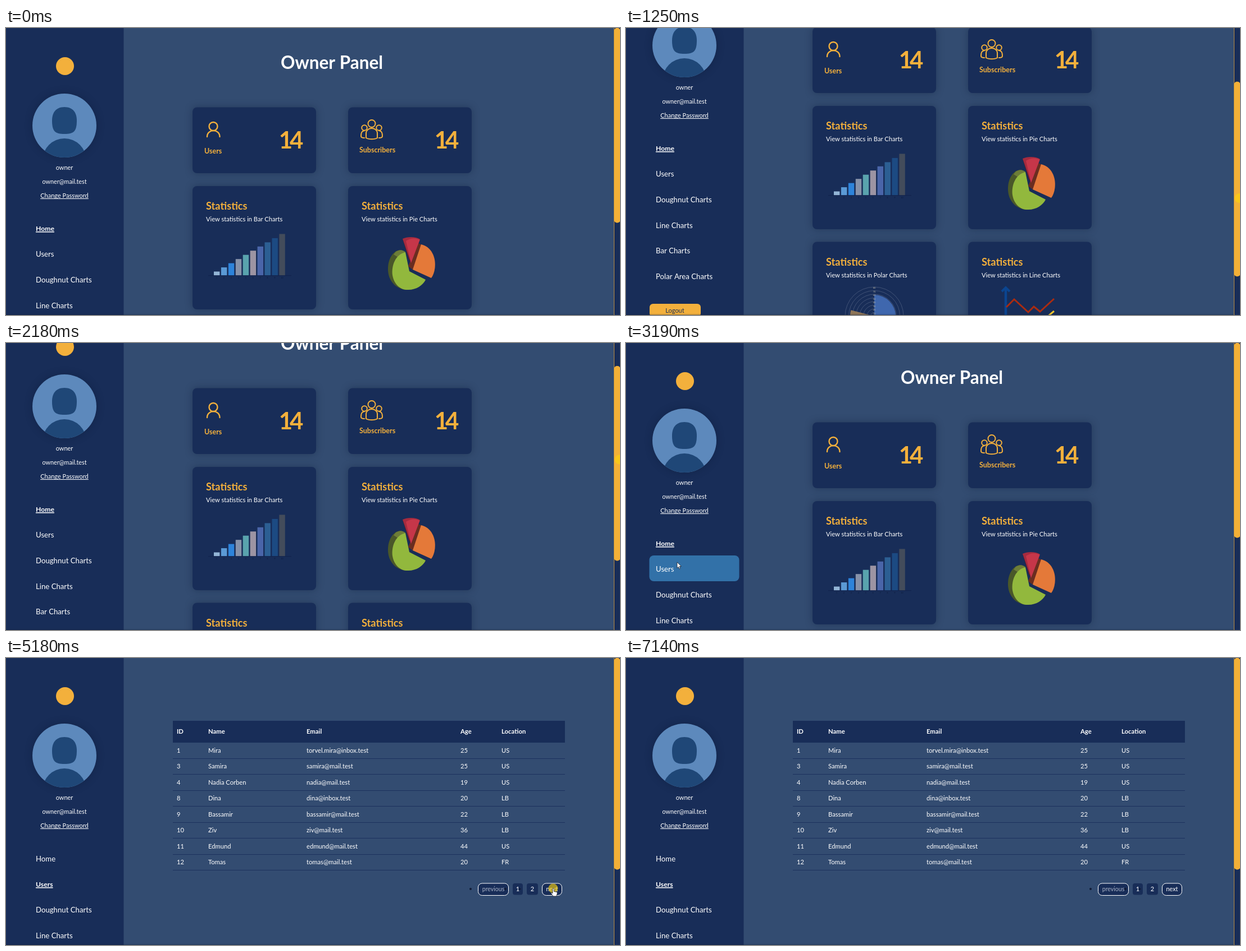
An HTML page with a canvas for the animation above (7470 ms loop, 1093 by 512 pixels).

```html
<!DOCTYPE html>
<html lang="en">
<head>
<meta charset="utf-8">
<title>Dashboard</title>
<style>
html, body { margin: 0; width: 100%; height: 100%; overflow: hidden; background: #334c71; }
canvas { display: block; width: 1093px; height: 512px; }
</style>
</head>
<body>
<canvas id="stage" width="1093" height="512"></canvas>
<script>
const ctx = document.getElementById('stage').getContext('2d');
const W = 1093, H = 512, LOOP = 7470, MAX_SCROLL = 245;
const NAVY = '#182d58', SLATE = '#334c71', GOLD = '#f3b03c', WHITE = '#fff';
const MENU = ['Home', 'Users', 'Doughnut Charts', 'Line Charts', 'Bar Charts', 'Polar Area Charts'];
const BARS = ['#93b5d6', '#5b9ad5', '#2d83da', '#8792a9', '#59a3ad', '#9c94a3', '#4a65a9', '#2c5f93', '#1c4a82', '#434c5b'];
const HEAD = ['ID', 'Name', 'Email', 'Age', 'Location'];
const PAGES = [[
  '1|Mira|torvel.mira@inbox.test|25|US', '3|Samira|samira@mail.test|25|US',
  '4|Nadia Corben|nadia@mail.test|19|US', '8|Dina|dina@inbox.test|20|LB',
  '9|Bassamir|bassamir@mail.test|22|LB', '10|Ziv|ziv@mail.test|36|LB',
  '11|Edmund|edmund@mail.test|44|US', '12|Tomas|tomas@mail.test|20|FR'
], [
  '13|Selma|selma@mail.test|31|FR', '14|Anton|anton@mail.test|27|US',
  '15|Noor|noor@mail.test|23|LB', '16|Petra|petra@mail.test|38|US',
  '17|Walid|walid@mail.test|29|LB', '18|Ines|ines@mail.test|24|FR',
  '19|Karim|karim@mail.test|41|LB', '20|Judith|judith@mail.test|33|US'
]];
const COLS = [[304, 360, 535, 809, 882], [304, 366, 528, 801, 876]];

// Pointer keys: time, x, y, 1 = hold until the next key
const POINTER = [
  [[70, 1059, 451, 1], [140, 1076, 341, 1], [210, 1076, 341]],
  [[2450, 964, 185, 1], [2520, 690, 330, 1], [2590, 420, 490, 1], [2650, 236, 405, 1],
   [2850, 212, 408], [2990, 170, 410], [3190, 91, 391], [3400, 84, 396], [3580, 88, 394], [3730, 88, 394],
   [3900, 250, 330], [4120, 534, 237], [4250, 590, 258], [4390, 620, 270], [4700, 860, 380],
   [4950, 974, 412], [5400, 974, 412], [5700, 920, 416], [5990, 872, 410], [6670, 872, 410],
   [6750, 880, 400], [6900, 930, 352], [7000, 1000, 380], [7080, 1039, 490], [7140, 1039, 514]]
];

const clamp = (v, a, b) => Math.min(b, Math.max(a, v));
const ramp = (t, a, b) => clamp((t - a) / (b - a), 0, 1);
const steps = (t, a, b, n) => clamp(Math.floor((t - a) / (b - a) * (n - 1) + .15) + 1, 0, n);

function text(s, x, y, size, { color = WHITE, bold = false, align = 'left', line = false, gap = 0, font = 'Lato' } = {}) {
  ctx.font = `${bold ? 700 : 400} ${size}px ${font}, sans-serif`;
  ctx.letterSpacing = gap + 'px';
  ctx.textAlign = align;
  ctx.fillStyle = color;
  const base = y + size * .36;
  ctx.fillText(s, x, base);
  if (line) {
    const w = ctx.measureText(s).width;
    ctx.fillRect(align === 'center' ? x - w / 2 : x, Math.round(base + 1), w, bold ? 1.5 : 1);
  }
}

function box(x, y, w, h, r, fill, stroke) {
  ctx.beginPath();
  ctx.roundRect(x, y, w, h, r);
  if (fill) { ctx.fillStyle = fill; ctx.fill(); }
  if (stroke) { ctx.strokeStyle = stroke; ctx.lineWidth = 1; ctx.stroke(); }
}

function disc(x, y, r, fill) {
  ctx.beginPath();
  ctx.arc(x, y, r, 0, 7);
  ctx.fillStyle = fill;
  ctx.fill();
}

function shape(d, fill, stroke, width = 1) {
  const p = new Path2D(d);
  if (fill) { ctx.fillStyle = fill; ctx.fill(p); }
  if (stroke) { ctx.strokeStyle = stroke; ctx.lineWidth = width; ctx.stroke(p); }
}

function shadowed(blur, draw) {
  ctx.save();
  ctx.shadowColor = 'rgba(10,22,50,.35)';
  ctx.shadowBlur = blur;
  draw();
  ctx.restore();
}

function at(x, y, draw) {
  ctx.save();
  ctx.translate(x, y);
  draw();
  ctx.restore();
}

function sidebar(active, hover) {
  ctx.fillStyle = NAVY;
  ctx.fillRect(0, -10, 209.5, 800);
  disc(105, 68, 16, GOLD);
  shadowed(14, () => disc(104, 174, 57, '#5d89bc'));
  ctx.save();
  ctx.beginPath();
  ctx.arc(104, 174, 57, 0, 7);
  ctx.clip();
  shape('M104 141C120 141 126 152 126 165C126 184 121 189 104 189C87 189 82 184 82 165C82 152 88 141 104 141Z', '#1f4777');
  disc(104, 236, 39, '#1f4777');
  ctx.restore();
  text('owner', 104, 249, 11, { align: 'center' });
  text('owner@mail.test', 104, 274, 10.8, { align: 'center' });
  text('Change Password', 104, 299, 11, { align: 'center', line: true });
  if (hover) {
    ctx.globalAlpha = hover;
    box(41.5, 379, 160, 46, 8, '#3271a8');
    ctx.globalAlpha = 1;
  }
  MENU.forEach((s, i) => {
    const on = i === active;
    text(s, 53, 358 + 45.6 * i, on ? 12.2 : 13.2, { bold: on, line: on });
  });
  box(42, 635, 91, 23, 6, GOLD);
  text('Logout', 87, 647, 11, { color: NAVY, align: 'center' });
}

function userIcon() {
  ctx.strokeStyle = GOLD;
  ctx.lineWidth = 2.4;
  ctx.lineCap = 'round';
  ctx.beginPath();
  ctx.arc(369, 175.5, 7.5, 0, 7);
  ctx.stroke();
  shape('M358 194C358 179.5 380.5 179.5 380.5 194', null, GOLD, 2.4);
}

function groupIcon() {
  [[651, 170.5, 6.5], [638, 178, 4.8], [664, 178, 4.8]].forEach(([x, y, r]) => {
    ctx.beginPath();
    ctx.arc(x, y, r, 0, 7);
    ctx.strokeStyle = GOLD;
    ctx.lineWidth = 2;
    ctx.stroke();
  });
  shape('M641 196V188C641 176 661 176 661 188V196C657 199 645 199 641 196Z', null, GOLD, 2);
  shape('M638 196C634 196 632 195 632 193C632 187 633 184 638 183M664 183C669 184 670 187 670 193C670 195 668 196 664 196', null, GOLD, 2);
}

function barChart() {
  BARS.forEach((c, i) => {
    const h = 7 + 7.45 * i;
    ctx.fillStyle = c;
    ctx.fillRect(370 + 12.93 * i, 441.5 - h, 10.4, h);
    text(String(i + 1), 375 + 12.93 * i, 445.5, 4, { color: '#0e1c3e', align: 'center' });
  });
  ctx.fillStyle = '#11214a';
  ctx.fillRect(360, 441.3, 148, 1);
}

function pieChart() {
  shape('M711 400C706 395 698 395 692 400C679 410 677 434 684 448C689 458 696 463 706 466L716 467Z', '#4a5829');
  shape('M711 400C706 395 699 395 693 400L690 404L698 409Z', '#6d7d38');
  shape('M718 434L711 400C693 404 686 424 688 441C691 459 704 468 716 467C731 467 742 459 747 449Z', '#92b83d');
  shape('M734 384L740 387L724 431L716 425Z', '#6b2d20');
  shape('M724 431L739 386C757 390 766 409 763.5 428C762.5 436 760 442 757 446Z', '#e47939');
  shape('M706 376L713 380L721 419L717 412Z', '#5f1c28');
  shape('M721 419L706 376C715 371.5 730 372 737 377Z', '#a62b3f');
  shape('M721 419L712 380C720 374 730 374 736.5 378Z', '#c63649');
}

function wedge(r, a, b, fill) {
  ctx.beginPath();
  ctx.moveTo(442, 657);
  ctx.arc(442, 657, r, a * Math.PI, b * Math.PI);
  ctx.fillStyle = fill;
  ctx.fill();
}

function polarChart() {
  for (let i = 1; i <= 8; i++) {
    ctx.beginPath();
    ctx.arc(442, 657, 6.5 * i, 0, 7);
    ctx.strokeStyle = 'rgba(170,180,195,.35)';
    ctx.lineWidth = .8;
    ctx.stroke();
  }
  wedge(38, -.5, 0, '#3f67ae');
  wedge(27, 0, .5, '#6f8a57');
  wedge(20, .5, .9, '#a24a4d');
  wedge(43, .9, 1.08, '#8f7658');
  for (let i = 1; i <= 8; i++) text(10 * i + '', 442, 659 - 6.5 * i, 4, { color: '#b9b6a8', align: 'center' });
}

function lineChart() {
  ctx.lineCap = 'butt';
  shape('M676 698V608M674 690H768', null, '#0b4590', 4.5);
  shape('M669 613L676 606L683 613M763 683L770 690L763 697', null, '#0b4590', 4);
  shape('M677 641L691 627L716 650L726 640L737 649L762 626', null, '#ab2b10', 3);
  shape('M680 679L697 662L714 676L738 668L762 648', null, '#f2c62e', 3);
}

function statCard(x, y, kind) {
  shadowed(14, () => box(x, y, 220, 220, 8, NAVY));
  text('Statistics', x + 24, y + 35.5, 18.2, { color: GOLD, bold: true });
  text(`View statistics in ${kind} Charts`, x + 24, y + 59.5, 11.1);
}

function home() {
  text('Owner Panel', 580, 62, 31.5, { bold: true, align: 'center' });
  [[332, 'Users', 353, 219], [609, 'Subscribers', 629, 217]].forEach(([x, label, lx, ly]) => {
    shadowed(14, () => box(x, 141.5, 220, 117.5, 8, NAVY));
    text(label, lx, ly, 12.5, { color: GOLD, bold: true });
    text('14', x + 173, 199.5, 42, { color: GOLD, bold: true, align: 'center', gap: -5 });
  });
  userIcon();
  groupIcon();
  statCard(332, 282, 'Bar');
  statCard(609, 282, 'Pie');
  statCard(332, 524.5, 'Polar');
  statCard(609, 524.5, 'Line');
  barChart();
  pieChart();
  polarChart();
  lineChart();
}

function users(page) {
  const cols = COLS[page], dim = '#aab3c6';
  ctx.fillStyle = NAVY;
  ctx.fillRect(297, 112, 698, 39);
  HEAD.forEach((s, i) => text(s, cols[i], 131, 11.3, { bold: true }));
  PAGES[page].forEach((row, r) => {
    const y = 164.5 + 28.5 * r;
    row.split('|').forEach((s, i) => text(s, cols[i], y, 11.2));
    ctx.fillStyle = '#1c315e';
    ctx.fillRect(297, Math.round(y + 14), 698, 1);
  });
  disc(827, 412, 2, '#101b36');
  box(840.5, 402, 54, 21.5, 7, NAVY, WHITE);
  text('previous', 867.5, 412, 10.6, { align: 'center', color: page ? WHITE : dim });
  disc(889, 412, 2, '#101b36');
  box(902, 402, 18, 20.5, 4, NAVY);
  box(927, 402, 20, 20.5, 4, NAVY);
  disc(915, 412, 1.6, '#101b36');
  text('1', 911, 412, 11, { align: 'center' });
  text('2', 937, 412, 11, { align: 'center' });
  box(954.5, 402, 35, 21.5, 7, NAVY, WHITE);
  text('next', 972, 412, 10.8, { align: 'center', color: page ? dim : WHITE });
}

function scrollbar(top, height) {
  ctx.fillStyle = NAVY;
  ctx.fillRect(1082, 0, 11, H);
  ctx.fillStyle = '#b98c3f';
  ctx.fillRect(1082, 0, 1, H);
  box(1082.5, top, 11, height, 5, '#f4b037');
}

function pointer(t) {
  const keys = POINTER.find(k => t >= k[0][0] && t < k[k.length - 1][0]);
  if (!keys) return null;
  const i = keys.findIndex(k => k[0] > t) - 1;
  const [a, x, y, hold] = keys[i], [b, x2, y2] = keys[i + 1];
  const f = hold ? 0 : (t - a) / (b - a);
  return [x + (x2 - x) * f, y + (y2 - y) * f];
}

function drawPointer(x, y) {
  const overButton = y > 402 && y < 424 && ((x > 954 && x < 990) || (x > 840 && x < 895));
  at(x, y, () => {
    ctx.lineJoin = 'round';
    if (overButton) shape('M-1 0C-1 -1.5 1.5 -1.5 1.5 0V4.5L6.5 5.5C7.5 6 7.5 7 7 9L6 13H0L-3.5 8C-4 6.5 -2.5 6 -1 8Z', WHITE, '#1a1f2c', .8);
    else shape('M0 0V10.5L2.4 8.3L4 12L5.8 11.2L4.2 7.6H7.5Z', WHITE, '#1a1f2c', .8);
  });
}

function clickMark(x, y) {
  disc(x, y, 8.5, 'rgba(252,212,12,.62)');
}

function draw(t) {
  const down = steps(t, 860, 1580, 12), up = steps(t, 1650, 2380, 12);
  const onUsers = t >= 3730;
  const part = (down - up) / 12, scroll = Math.round(MAX_SCROLL * part);
  const hover = ramp(t, 2920, 3150) * (1 - ramp(t, 3790, 3960));

  ctx.fillStyle = SLATE;
  ctx.fillRect(0, 0, W, H);
  at(0, -scroll, () => {
    sidebar(onUsers ? 1 : 0, hover);
    if (onUsers) users(t >= 5320 && t < 6200 ? 1 : 0);
    else home();
  });
  ctx.fillStyle = 'rgba(12,24,52,.3)';
  ctx.fillRect(0, 510.5, 1082, 1.5);
  scrollbar(164 * part, onUsers ? 377.5 : 347.5);

  if (t >= 3660 && t < 4520) {
    box(-4, 497, 366, 20, 3, '#6f9aa2');
    text('localhost:3001/owner/view-users', 1, 505, 8.6, { color: '#26394a', font: 'Open Sans' });
  }
  if (t >= 860 && t < 2380) clickMark(1092, up ? Math.max(208, 372 - 19.4 * up) : 208 + 13.66 * down);

  const p = pointer(t);
  if (!p) return;
  const clicking = [[3600, 3730], [5170, 5320], [6130, 6300]].some(([a, b]) => t >= a && t < b);
  if (clicking) clickMark(p[0], p[1] - 1);
  drawPointer(...p);
}

const start = performance.now();
function tick() {
  draw((performance.now() - start) % LOOP);
  requestAnimationFrame(tick);
}
tick();
</script>
</body>
</html>
```
